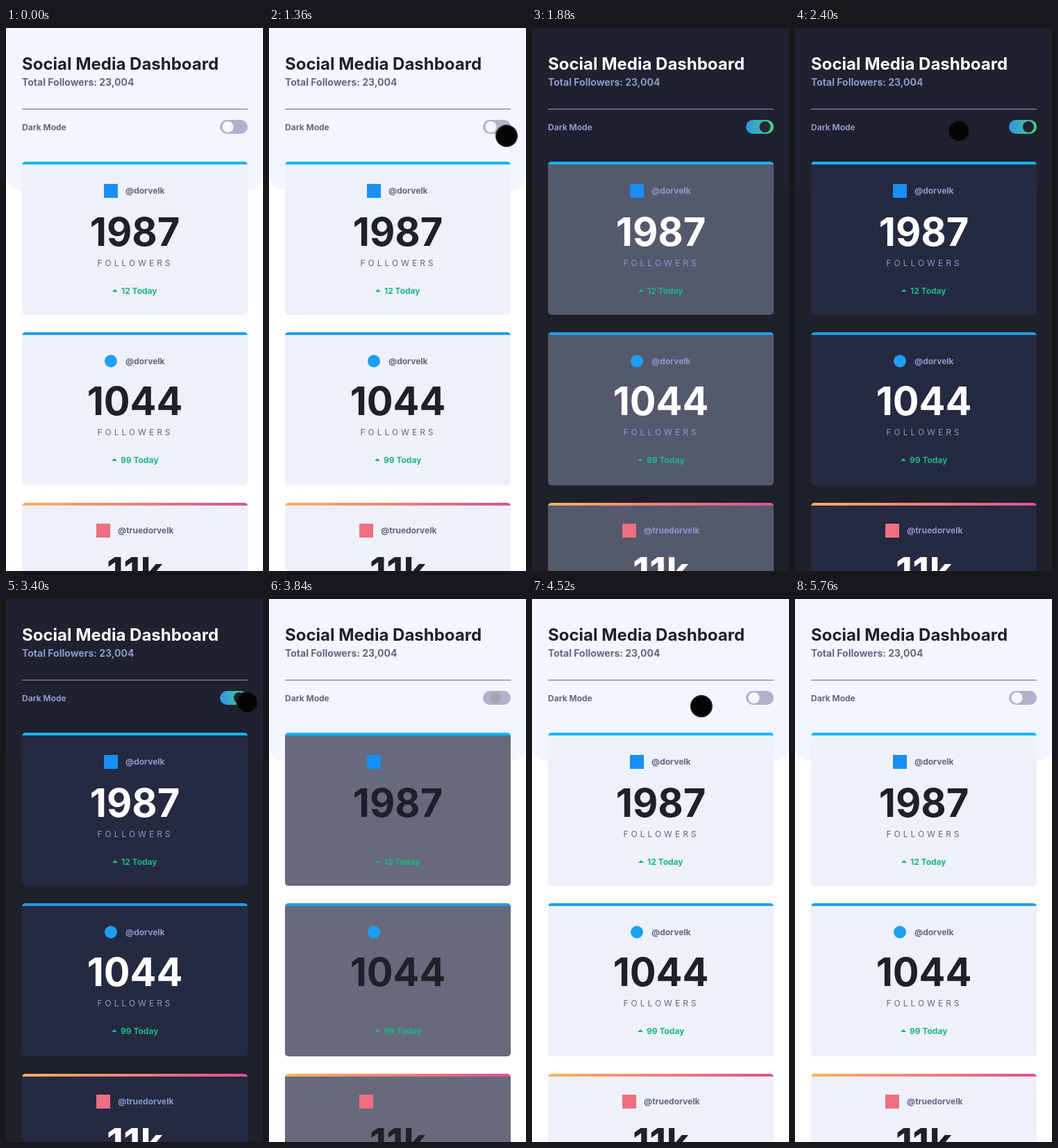
An HTML page that plays this animation: 370x780 px, repeating every 5.84 s.

```html
<!DOCTYPE html>
<html lang="en">
<head>
<meta charset="utf-8">
<title>Social Media Dashboard</title>
<style>
  html, body { margin: 0; width: 100%; height: 100%; overflow: hidden; }
  svg {
    --page: #fff; --top: #f3f6fe; --head: #1e202a; --text: #63687e; --pill: #aeb3cb;
    display: block; width: 370px; height: 780px; background: var(--page);
    font: 700 12px Inter, sans-serif;
  }
  svg.dark {
    --page: #1e202a; --top: #1f212e; --head: #fff; --text: #8b98cb; --pill: url(#on);
  }
  .head { fill: var(--head); }
  .text { fill: var(--text); }
  .title { font-size: 24px; }
  .total { font-size: 14px; }
  .count { font-size: 56px; text-anchor: middle; }
  .label { font-weight: 400; letter-spacing: 4px; text-anchor: middle; }
  .gain { fill: #1db489; }
  .card { fill: var(--card); }
</style>
</head>
<body>
<svg id="stage" viewBox="0 0 370 780">
  <defs>
    <linearGradient id="on"><stop stop-color="#378fe6"/><stop offset="1" stop-color="#3eda82"/></linearGradient>
    <linearGradient id="warm"><stop stop-color="#fcb260"/><stop offset="1" stop-color="#e04f90"/></linearGradient>
  </defs>
  <rect y="-20" width="370" height="252" rx="20" fill="var(--top)"/>
  <text class="head title" x="23" y="60">Social Media Dashboard</text>
  <text class="text total" x="23" y="83">Total Followers: 23,004</text>
  <rect class="text" x="23" y="116" width="325" height="1"/>
  <text class="text" x="23" y="147">Dark Mode</text>
  <rect x="308" y="132" width="40" height="20" rx="10" fill="var(--pill)"/>
  <circle id="knob" cy="142" r="8"/>
  <g id="cards"></g>
  <circle id="dot" r="15" fill="#050505" stroke="#1d1e23" stroke-width="2"/>
</svg>
<script>
const LOOP = 5840, DARK_AT = 1650, LIGHT_AT = 3735;
const $ = id => document.getElementById(id);
const stage = $('stage'), knob = $('knob'), dot = $('dot');

// y: card top, row: top of the icon row, base: baseline of the count
const cards = [
  { y: 192, row: 234, base: 313, bar: '#0db8f6', x: 172, name: '@dorvelk', count: '1987', gain: '12 Today', gx: 166,
    icon: '<rect x="141" y="224" width="20" height="20" fill="#178ff5"/>' },
  { y: 437, row: 479, base: 556, bar: '#1f9fea', x: 172, name: '@dorvelk', count: '1044', gain: '99 Today', gx: 165,
    icon: '<circle cx="151" cy="478.5" r="9" fill="#1ca0f2"/>' },
  { y: 682, row: 722, base: 801, bar: 'url(#warm)', x: 161, name: '@truedorvelk', count: '11k', gain: '', gx: 165,
    icon: '<rect x="130" y="712" width="20" height="20" fill="#ee6f82"/>' }
];

$('cards').innerHTML = cards.map(c => `
  <rect x="23" y="${c.y}" width="325" height="10" rx="5" fill="${c.bar}"/>
  <path class="card" d="M23 ${c.y + 4}h325v211a5 5 0 0 1-5 5h-315a5 5 0 0 1-5-5z"/>
  ${c.icon}
  <text class="text" x="${c.x}" y="${c.row + 4}">${c.name}</text>
  <text class="head count" x="185.5" y="${c.base}">${c.count}</text>
  <text class="text label" x="186" y="${c.base + 29}">FOLLOWERS</text>
  <path class="gain" d="M${c.gx - 13} ${c.base + 66}l4-4 4 4z"/>
  <text class="gain" x="${c.gx}" y="${c.base + 69}">${c.gain}</text>`).join('');

// Pointer visits: [time, x, y]; hidden between visits
const visits = [
  [[640, 318, 800], [1000, 342, 190], [1360, 342, 155], [1680, 342, 155]],
  [[2240, 318, 150], [2400, 236, 148], [2540, 222, 150], [2960, 222, 150], [3360, 348, 148], [3740, 342, 152]],
  [[4340, 322, 152], [4520, 244, 154], [4660, 226, 156], [5320, 226, 156], [5600, 226, -20]]
];

const clamp = v => Math.min(1, Math.max(0, v));
const mix = (a, b, k) => a + (b - a) * k;
const mixColor = (a, b, k) => `rgb(${a.map((v, i) => Math.round(mix(v, b[i], k)))})`;

// cubic-bezier(.25, .1, .25, 1)
function ease(x) {
  if (x <= 0 || x >= 1) return clamp(x);
  const curve = (s, p, q) => 3 * s * (1 - s) ** 2 * p + 3 * s * s * (1 - s) * q + s ** 3;
  let lo = 0, hi = 1;
  for (let i = 0; i < 20; i++) {
    const mid = (lo + hi) / 2;
    if (curve(mid, .25, .25) < x) lo = mid; else hi = mid;
  }
  return curve(lo, .1, 1);
}

// 0 is light, 1 is dark
const shift = (t, span) => ease((t - DARK_AT) / span) - ease((t - LIGHT_AT) / span);

function placeDot(t) {
  const path = visits.find(p => t >= p[0][0] && t < p[p.length - 1][0]);
  dot.style.display = path ? '' : 'none';
  if (!path) return;
  const i = path.findIndex(p => p[0] > t);
  const [a, b] = [path[i - 1], path[i]];
  const k = (t - a[0]) / (b[0] - a[0]);
  dot.setAttribute('cx', mix(a[1], b[1], k));
  dot.setAttribute('cy', mix(a[2], b[2], k));
}

function draw(now) {
  const t = now % LOOP;
  stage.classList.toggle('dark', t >= DARK_AT && t < LIGHT_AT);
  stage.style.setProperty('--card', mixColor([238, 241, 249], [37, 42, 65], shift(t, 500)));
  const k = shift(t, 300);
  knob.setAttribute('cx', mix(319.5, 336, k));
  knob.setAttribute('fill', mixColor([245, 247, 255], [31, 33, 46], k));
  placeDot(t);
}

const start = performance.now();
function tick() {
  draw(performance.now() - start);
  requestAnimationFrame(tick);
}
tick();
</script>
</body>
</html>
```
